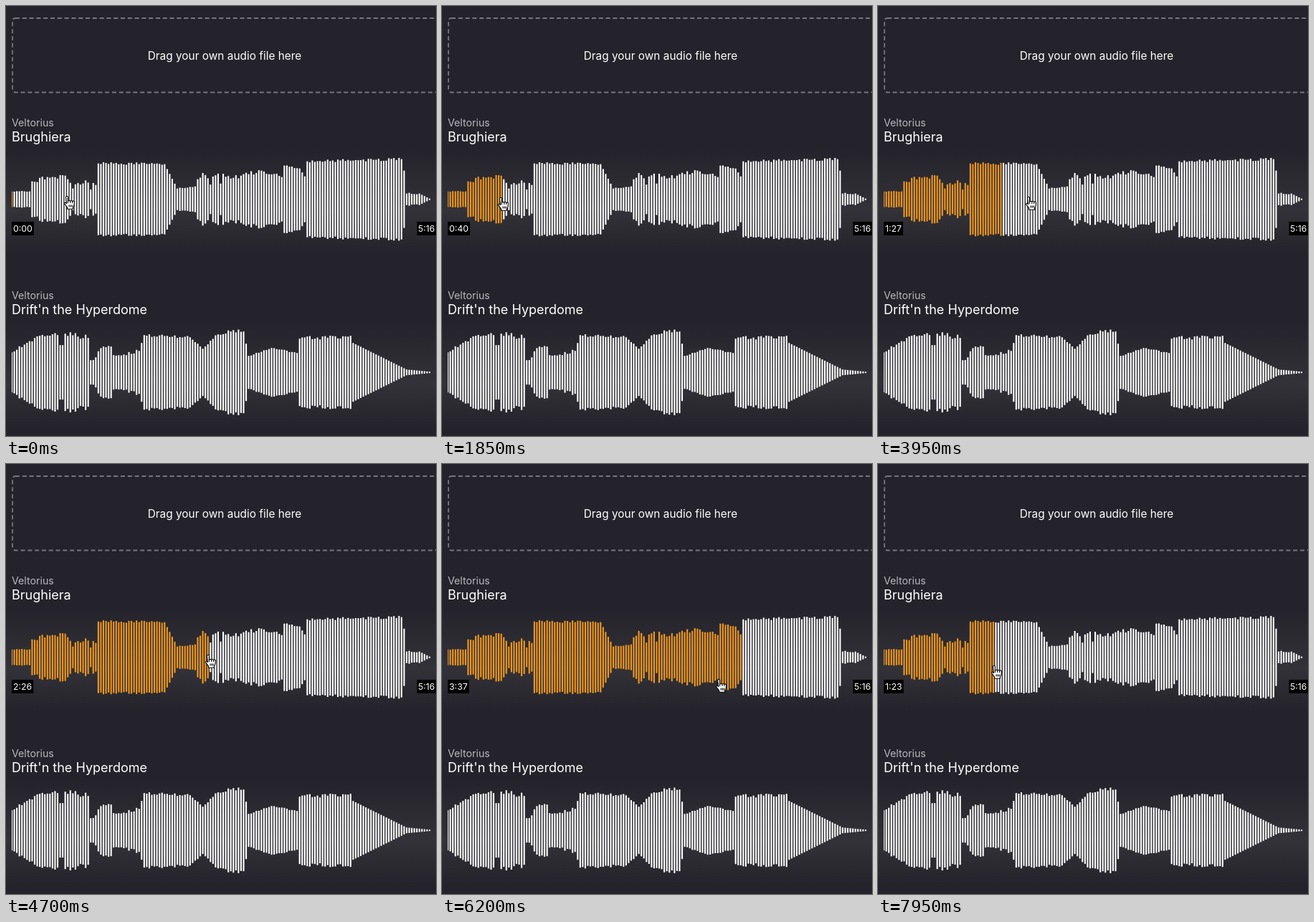
An HTML page for the animation above (8 s loop, 600 px wide and 600 px high).

```html
<!DOCTYPE html>
<html lang="en">
<head>
<meta charset="utf-8">
<title>Waveform player</title>
<style>
  html, body { margin: 0; width: 100%; height: 100%; overflow: hidden; background: #24232b; }
  svg { display: block; width: 600px; height: 600px; }
  text { font-family: Inter, Roboto, sans-serif; fill: #fff; }
  .artist { font-size: 14.2px; fill: #b9b8bd; }
  .title { font-size: 18px; }
  .time { font-size: 12.3px; }
</style>
</head>
<body>
<svg viewBox="0 0 600 600">
  <defs>
    <linearGradient id="glow" x1="0" y1="0" x2="0" y2="1">
      <stop offset="0" stop-color="#24232b"/>
      <stop offset=".58" stop-color="#333238"/>
      <stop offset="1" stop-color="#24232b"/>
    </linearGradient>
    <clipPath id="edge"><path d="M8 0H603V600H8Z"/></clipPath>
  </defs>
  <rect y="200" width="600" height="146" fill="url(#glow)"/>
  <rect y="441.5" width="600" height="146" fill="url(#glow)"/>
  <rect x="9" y="17" width="593" height="103.5" rx="4" fill="none" stroke="#77767d" stroke-width="1.8" stroke-dasharray="6 3.8"/>
  <text x="305" y="74.8" text-anchor="middle" font-size="15.4">Drag your own audio file here</text>
  <text class="artist" x="8" y="167.5">Veltorius</text>
  <text class="title" x="8" y="188.7">Brughiera</text>
  <text class="artist" x="8" y="409">Veltorius</text>
  <text class="title" x="8" y="430.2">Drift'n the Hyperdome</text>
  <g id="waves" clip-path="url(#edge)"></g>
  <rect id="badge" x="8" y="301" width="31" height="19"/>
  <text id="clock" class="time" x="10" y="315.2">0:00</text>
  <rect x="573.5" y="301" width="30" height="19"/>
  <text class="time" x="575" y="315.2">5:16</text>
  <path id="hand" fill="#fff" stroke="#000" stroke-width="1.1" stroke-linejoin="round"
    d="M-2.6 1.2V-7C-2.6-9.4-5.7-9.4-5.5-6.8L-4.4 1.6C-6.6-.6-8.2 .6-7 2.4L-3.4 7.2V9.2H4.4V7.2C5.8 5.2 6.4 3.4 6.4 1V-.6C6.4-2.4 4-2.5 3.7-1C3.5-3 1.1-3 .8-1.4C.4-3-2.2-3-2.6-1.2M.8-1.4V1M3.7-1V1.2M-.9 3.4V6.6M1.2 3.4V6.6M3.2 3.4V6.6"/>
</svg>
<script>
const LOOP = 8000, STEP = 50;
const LEFT = 8, PITCH = 3.555, BAR = 2.1, COUNT = 165;
const SPEED = 1.88; // pixels per second of audio
const WHITE = '#fff', ORANGE = '#f2991f';
const $ = id => document.getElementById(id);
const [clock, badge, hand, waves] = ['clock', 'badge', 'hand', 'waves'].map($);
const mix = (a, b, k) => a + (b - a) * k;
const barX = i => LEFT + i * PITCH;

// Key points of the envelopes: [bar, half height, roughness until the next point]
const firstTrack = [
  [0, 11, 1], [7, 11], [8, 25, 4], [21, 33], [23, 23, 9], [33, 20], [34, 50, 2], [60, 49], [65, 15, 1],
  [72, 18], [73, 28, 9], [86, 29, 3], [98, 40, 3], [106, 31], [107, 47, 1], [113, 43], [115, 32],
  [116, 53, 2], [153, 56], [154, 40], [155, 8, 1], [160, 8], [164, 1]
];
const secondTrack = [
  [0, 28, 2], [11, 51, 3], [18, 52], [19, 38], [20, 38], [21, 54, 4], [30, 48], [31, 17, 4], [36, 36, 1],
  [39, 36], [40, 24, 1], [45, 24, 4], [50, 30], [52, 52, 2], [70, 49, 1], [75, 33, 3], [81, 53, 4],
  [91, 57], [93, 23, 1], [102, 34, 1], [112, 27], [113, 47, 3], [133, 51], [134, 41], [155, 4], [164, 1]
];

// Cursor moves: [start ms, end ms, x, y]
const moves = [
  [0, 1, 89, 274], [50, 100, 98, 274], [350, 800, 86, 276], [2300, 3400, 175, 275],
  [3750, 4250, 286, 275], [4850, 5450, 419, 262], [6000, 6450, 350, 375],
  [6450, 6950, 197, 319], [6950, 7200, 160, 449], [7200, 7500, 166, 290]
];

// Seeks: [ms, audio seconds]
const seeks = [[0, .22], [1800, 40.6], [3500, 87], [4450, 146.6], [5700, 217.3], [7500, 82.6]];

function randomFrom(seed) {
  return () => (seed = (seed * 16807) % 2147483647) / 2147483647;
}

function drawTrack(points, middle, seed) {
  const random = randomFrom(seed);
  return Array.from({ length: COUNT }, (_, i) => {
    const next = Math.max(1, points.findIndex(p => p[0] >= i));
    const [from, to] = [points[next - 1], points[next]];
    const rough = i === from[0] || i === to[0] ? 0 : from[2] || 0;
    const half = mix(from[1], to[1], (i - from[0]) / (to[0] - from[0])) + (random() * 2 - 1) * rough;
    const bar = document.createElementNS('http://www.w3.org/2000/svg', 'rect');
    const box = { x: barX(i) - BAR / 2, y: middle - half, width: BAR, height: half * 2, fill: WHITE };
    for (const name in box) bar.setAttribute(name, box[name]);
    waves.append(bar);
    return bar;
  });
}

const bars = drawTrack(firstTrack, 269.7, 71);
drawTrack(secondTrack, 511.2, 907);

function cursorAt(ms) {
  let [x, y] = moves[0].slice(2);
  for (const [start, end, toX, toY] of moves) {
    const k = Math.min(1, Math.max(0, (ms - start) / (end - start)));
    const ease = k * k * (3 - 2 * k);
    x = mix(x, toX, ease);
    y = mix(y, toY, ease);
  }
  return [x, y];
}

function render(ms) {
  const [at, start] = seeks.filter(s => s[0] <= ms).pop();
  const seconds = start + (ms - at) / 1000;
  const head = LEFT + seconds * SPEED;
  bars.forEach((bar, i) => bar.setAttribute('fill', barX(i) <= head ? ORANGE : WHITE));

  const whole = Math.floor(seconds);
  clock.textContent = Math.floor(whole / 60) + ':' + String(whole % 60).padStart(2, '0');
  badge.setAttribute('width', clock.getComputedTextLength() + 4);
  hand.setAttribute('transform', `translate(${cursorAt(ms)})`);
}

const begin = performance.now();
function tick() {
  const ms = (performance.now() - begin) % LOOP;
  render(Math.floor(ms / STEP) * STEP);
  requestAnimationFrame(tick);
}
tick();
</script>
</body>
</html>
```
